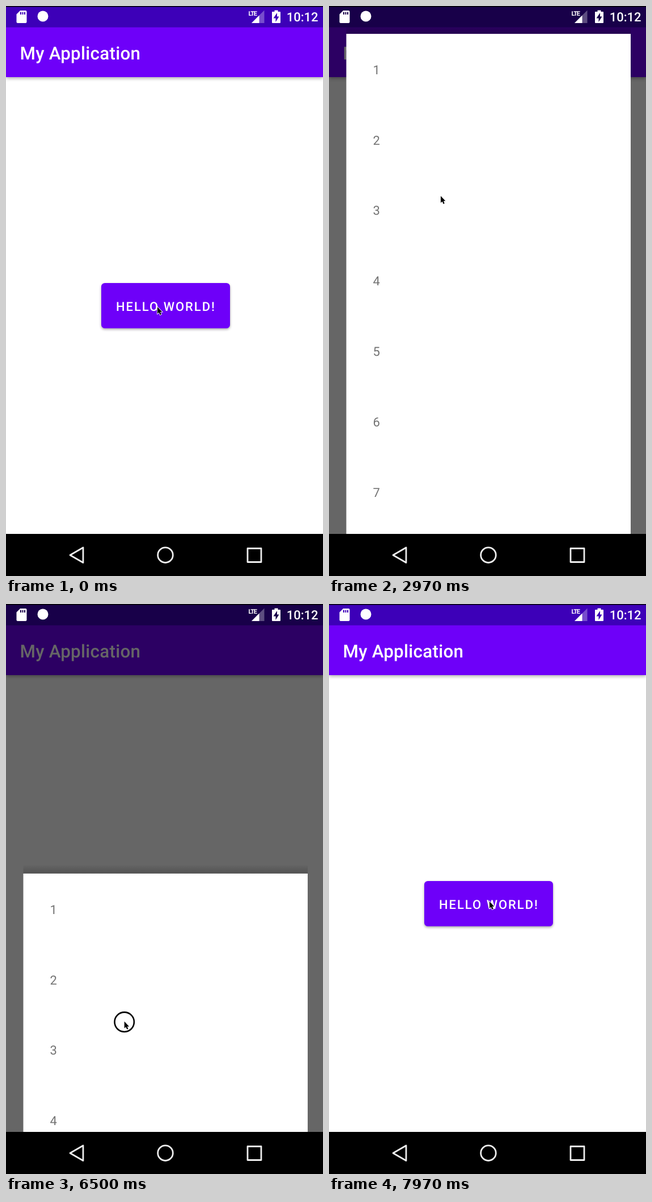
Animation of 559x1002 px, one loop 8 s. Source, as an HTML page:

```html
<!DOCTYPE html>
<html lang="en">
<head>
<meta charset="utf-8">
<title>Bottom sheet</title>
<style>
  html, body { margin: 0; width: 100%; height: 100%; overflow: hidden; background: #fff; }
  svg { display: block; width: 559px; height: 1002px; }
  text { font-family: Roboto, "Noto Sans", sans-serif; font-size: 22px; text-rendering: geometricPrecision; }
  .medium { font-weight: 500; fill: #fff; }
  #title { font-size: 31.4px; letter-spacing: .24px; }
  #label { letter-spacing: 1.96px; }
  #lte { font-size: 11px; font-weight: 700; letter-spacing: -1.2px; }
  #rows { fill: #737373; }
  #bar { filter: drop-shadow(0 2px 3px rgba(0, 0, 0, .35)); }
  #button { filter: drop-shadow(0 2px 2px rgba(0, 0, 0, .35)); }
</style>
</head>
<body>
<svg viewBox="0 0 559 1002">
  <defs>
    <linearGradient id="fade" x2="0" y2="1">
      <stop offset="0" stop-color="#000" stop-opacity="0"/>
      <stop offset="1" stop-color="#000" stop-opacity=".2"/>
    </linearGradient>
    <clipPath id="window"><rect y="37.5" width="559" height="890.5"/></clipPath>
  </defs>

  <rect width="559" height="1002" fill="#fff"/>
  <rect id="bar" y="37" width="559" height="88" fill="#6e00f9"/>
  <rect width="559" height="37.5" fill="#3d00b8"/>
  <text id="title" class="medium" x="24.5" y="93.5">My Application</text>
  <rect id="button" x="168" y="487" width="227" height="79.5" rx="6.3" fill="#6e00f9"/>
  <text id="label" class="medium" x="194" y="535.5">HELLO WORLD!</text>
  <rect id="dim" width="559" height="928"/>

  <g clip-path="url(#window)">
    <g id="sheet">
      <rect x="30.5" y="-16" width="501.5" height="16" fill="url(#fade)"/>
      <rect x="30.5" width="501.5" height="1000" fill="#fff"/>
      <g id="rows"></g>
    </g>
  </g>

  <g fill="#fff">
    <path fill-rule="evenodd" d="M25 8H34.500Q36.500 8 36.500 10V28Q36.500 30 34.500 30H20.500Q18.500 30 18.500 28V14.500ZM25 10.500V15H27V10.500ZM28.500 10.500V15H30.500V10.500ZM32 10.500V15H34V10.500Z"/>
    <circle cx="65" cy="18" r="9.500"/>
    <text id="lte" x="427.500" y="17">LTE</text>
    <path d="M433 30L455.500 7.500V30Z" opacity=".3"/>
    <path d="M433 30L446.500 16.500V30Z"/>
    <path fill-rule="evenodd" d="M473.500 7.500H479.500V10H483Q484 10 484 11V29Q484 30 483 30H470Q469 30 469 29V11Q469 10 470 10H473.500ZM478 12L471.500 21.500H475.500V28L481.500 18.500H478Z"/>
    <text class="medium" x="550.500" y="27.200" text-anchor="end">10:12</text>
  </g>
  <rect width="559" height="1.5"/>

  <rect y="928" width="559" height="74"/>
  <g fill="none" stroke="#eee" stroke-width="2.8" stroke-linejoin="round">
    <path d="M113 965.200L136 952V978.500Z"/>
    <circle cx="281" cy="965.200" r="13.300"/>
    <rect x="426" y="953.500" width="24" height="24"/>
  </g>

  <g id="pointer">
    <circle id="ring" cy="1" r="17.200" fill="none" stroke="#000" stroke-width="2.600"/>
    <path d="M0 0V12L2.700 9.600L4.600 14L6.800 13L4.900 8.800H8.400Z" stroke="#fff" stroke-width="1.600" paint-order="stroke"/>
  </g>
</svg>
<script>
const LOOP = 8000, HIDDEN = 945, PEEK = 319, FULL = 37;
const $ = id => document.getElementById(id);
const clamp = v => Math.min(1, Math.max(0, v));
const span = (t, a, b) => clamp((t - a) / (b - a));
const mix = (a, b, k) => a + (b - a) * k;
const smooth = k => k * k * (3 - 2 * k);
const settle = k => 1 - (1 - k) ** 5;

for (let i = 0; i < 8; i++) {
  $('rows').innerHTML += `<text x="77.500" y="${70.8 + i * 123.85}">${i + 1}</text>`;
}

// Each pointer key: time, x, y, and whether the leg to it is eased.
const path = [
  [0, 267, 529], [900, 267, 529], [1640, 194, 507, true], [1700, 194, 507],
  [1770, 192, 460], [1943, 197, 328], [3900, 197, 328], [4500, 212, 300, true],
  [4700, 212, 300], [5770, 214, 662], [7011, 205, 784], [7200, 205, 784],
  [7880, 283, 523, true], [LOOP, 283, 523]
];
const presses = [[100, 260], [1670, 1943], [4560, 7011]];

function pointerAt(t) {
  const i = path.findIndex(key => key[0] > t);
  const a = path[i - 1], b = path[i];
  let k = span(t, a[0], b[0]);
  if (b[3]) k = smooth(k);
  return [mix(a[1], b[1], k), mix(a[2], b[2], k)];
}

function sheetTop(t) {
  if (t < 1700) return mix(HIDDEN, PEEK, 1 - (1 - span(t, 300, 790)) ** 3);
  if (t < 1770) return mix(PEEK, 285, span(t, 1700, 1770));
  if (t < 1943) return mix(285, 159, span(t, 1770, 1943));
  if (t < 4700) return mix(159, FULL, settle(span(t, 1943, 4708)));
  if (t < 5770) return mix(FULL, 402, span(t, 4700, 5770));
  if (t < 7011) return mix(402, 524, span(t, 5770, 7011));
  return mix(524, 928, settle(span(t, 7011, 7750))) + (HIDDEN - 928) * span(t, 7600, 7750);
}

function draw(t) {
  const [x, y] = pointerAt(t);
  // The list pointer sits lower once the finger is lifted and the sheet settles.
  const lift = 7 * span(t, 1943, 2050) * (1 - span(t, 3900, 4500));
  $('pointer').setAttribute('transform', `translate(${x} ${y + lift - 1 * (lift > 0)})`);
  $('ring').style.display = presses.some(([a, b]) => t >= a && t < b) ? '' : 'none';
  $('sheet').setAttribute('transform', `translate(0 ${sheetTop(t)})`);
  $('dim').setAttribute('opacity', .6 * span(t, 250, 600) * (1 - span(t, 7700, 7930)));
}

function tick(now) {
  draw(now % LOOP);
  requestAnimationFrame(tick);
}
draw(0);
requestAnimationFrame(tick);
</script>
</body>
</html>
```
